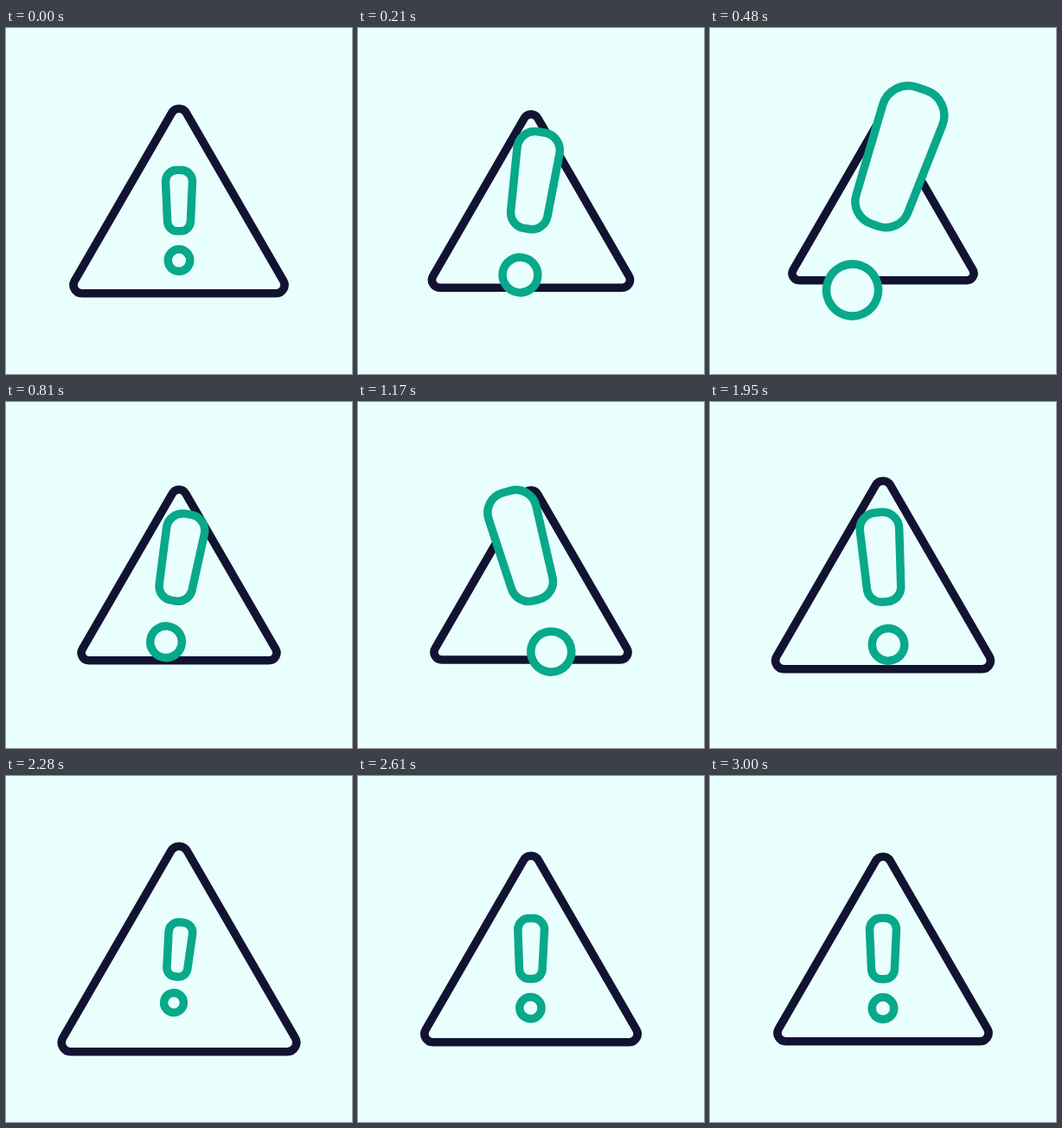
Write an HTML page with a canvas that moves like this. It is 400x400 px and loops after 3.03 s.

```html
<!DOCTYPE html>
<html lang="en">
<head>
<meta charset="utf-8">
<title>Warning sign</title>
<style>
  html, body { margin: 0; width: 100%; height: 100%; overflow: hidden; background: #e8fffe; }
  canvas { display: block; width: 400px; height: 400px; }
</style>
</head>
<body>
<canvas id="stage" width="400" height="400"></canvas>
<script>
const ctx = document.getElementById('stage').getContext('2d');
const BG = '#e8fffe', NAVY = '#121331', GREEN = '#08a88a';
const LOOP = 3030, STEP = 30;

// Poses in steps: rest, swing right, middle, swing left, overshoot, rest
const RIGHT = 15.2, LEFT = 54.5, OVER = 73, REST = 90;

// The leg that arrives at the left swing has its own easing
function track(mid, values, easing) {
  const times = [0, RIGHT, mid, LEFT, OVER, REST];
  const keys = times.map((t, i) => ({ t, v: values[i] })).filter(k => k.v !== null);
  return t => {
    const i = keys.findIndex(k => k.t > t);
    if (i < 0) return keys[keys.length - 1].v;
    const from = keys[i - 1], to = keys[i];
    const x = (t - from.t) / (to.t - from.t);
    return from.v + (to.v - from.v) * ease(x, to.t === LEFT ? easing : undefined);
  };
}

// Cubic bezier (a, 0, b, 1), solved by bisection
function ease(x, [a, b] = [0.36, 0.64]) {
  let lo = 0, hi = 1, p = x;
  for (let i = 0; i < 24; i++) {
    p = (lo + hi) / 2;
    const q = 1 - p;
    if (3 * q * q * p * a + 3 * q * p * p * b + p * p * p < x) lo = p; else hi = p;
  }
  return p * p * (3 - 2 * p);
}

const signScale = track(32, [1, 0.86, 0.942, 0.861, 1.122, 1], [0.4, 0.35]);
const markScale = track(28, [1, 2.365, 1.42, 2.36, 0.885, 1], [0.4, 0.45]);
const markTilt = track(0, [0, 19, null, -20.1, 6, 0], [0.54, 0.15]);
const markDrop = track(28, [22.8, 0.9, 13, 1.4, 21.3, 22.8], [0.4, 0.45]);
const markSway = track(32, [0, 0, -1.8, 0, 0, 0]);

// Symmetric outline from the half widths and corner radii at top and bottom
function taper(halfTop, top, rTop, halfBottom, bottom, rBottom, scale) {
  ctx.beginPath();
  ctx.moveTo(0, bottom * scale);
  const corners = [
    [-halfBottom, bottom, rBottom], [-halfTop, top, rTop],
    [halfTop, top, rTop], [halfBottom, bottom, rBottom], [0, bottom, 0]
  ].filter(([x], i) => x !== 0 || i === 1 || i === 4);
  for (let i = 0; i < corners.length - 1; i++) {
    const [x, y, r] = corners[i], [nx, ny] = corners[i + 1];
    ctx.arcTo(x * scale, y * scale, nx * scale, ny * scale, r * scale);
  }
  ctx.closePath();
}

function paint(color) {
  ctx.fillStyle = BG;
  ctx.strokeStyle = color;
  ctx.lineWidth = 9.5;
  ctx.fill();
  ctx.stroke();
}

function draw(t) {
  ctx.setTransform(1, 0, 0, 1, 0, 0);
  ctx.fillStyle = BG;
  ctx.fillRect(0, 0, 400, 400);

  ctx.translate(200, 200);
  taper(0, -116.3, 9.5, 129, 106.7, 9.5, signScale(t));
  paint(NAVY);

  const size = markScale(t);
  ctx.translate(markSway(t), 0);
  ctx.rotate(markTilt(t) * Math.PI / 180);
  ctx.translate(0, markDrop(t) - 23.3 * size);
  taper(16.1, -35.3, 13, 12.9, 35.3, 11.5, size);
  paint(GREEN);

  ctx.beginPath();
  ctx.arc(0, 69.1 * size, 12.75 * size, 0, Math.PI * 2);
  paint(GREEN);
}

const start = performance.now();
function tick() {
  const ms = (performance.now() - start) % LOOP;
  draw(Math.floor(ms / STEP));
  requestAnimationFrame(tick);
}
tick();
</script>
</body>
</html>
```
